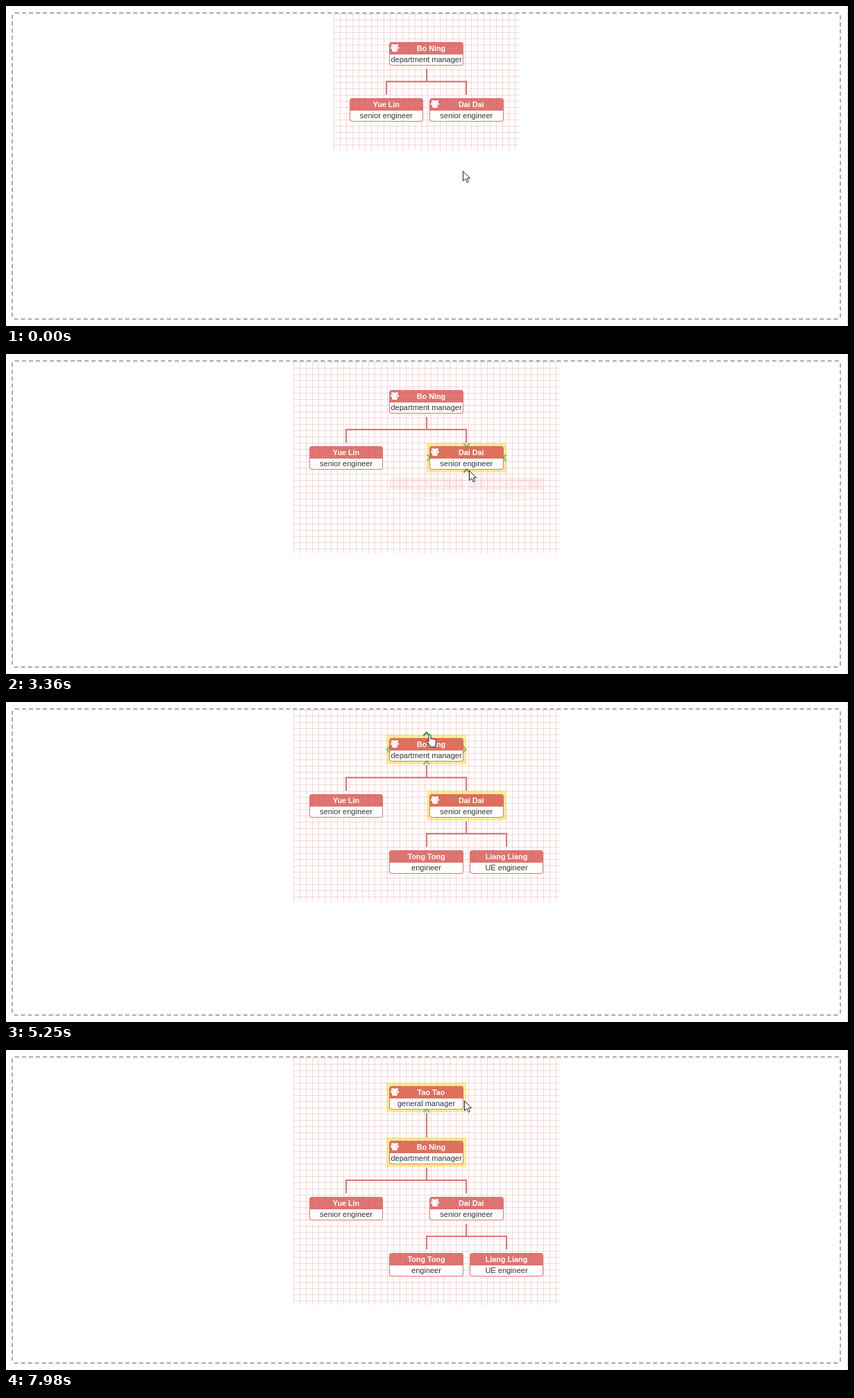
These frames come from a looping animation (1213x462 px, 8000 ms). An HTML page:

```html
<!DOCTYPE html>
<html lang="en">
<head>
<meta charset="utf-8">
<title>Org chart</title>
<style>
html, body { margin: 0; width: 100%; height: 100%; overflow: hidden; background: #fff; }
body { position: relative; font: 11px "Liberation Sans", Arial, sans-serif; color: #333; }
div, svg { position: absolute; box-sizing: border-box; }
svg { left: 0; top: 0; overflow: visible; fill: none; }
#frame { left: 8px; top: 9px; width: 1195px; height: 444px; border: 2px dashed #aaa; border-radius: 5px; }
#edge { left: 1212px; top: 0; width: 1px; height: 100%; background: #ddd; }
.grid {
  top: 11px;
  background: linear-gradient(90deg, rgba(200,0,0,.15) 1px, transparent 0),
              linear-gradient(rgba(200,0,0,.15) 1px, transparent 0);
  background-size: 9px 9px;
}
.node { width: 115.5px; height: 43px; text-align: center; white-space: nowrap; }
.title, .role { left: 4.5px; width: 106.5px; }
.title {
  top: 5px; height: 18px; font-weight: bold; font-size: 10.8px; line-height: 18px; color: #fff;
  background: rgba(217,83,79,.8); border-radius: 4px 4px 0 0;
}
.lead { padding-left: 14px; }
.title svg { left: 2px; top: 2px; fill: #fff; }
.role {
  top: 23px; height: 16px; line-height: 15px; background: #fff;
  border: 1px solid rgba(217,83,79,.8); border-top: 0; border-radius: 0 0 4px 4px;
}
.loading .title, .loading .role { opacity: .2; }
.line { stroke: rgba(217,83,79,.8); stroke-width: 2; }
</style>
</head>
<body>
<div id="frame"></div>
<div id="edge"></div>
<div id="scene"></div>
<script>
const LOOP = 8000, STEP = 70;
const MID = 605.5, SLOT = 115.5, ROW = 81, TOP = 47;
const GREEN = 'rgba(68,157,68,.5)', STRONG = '#449d44';

// Moments of the story
const HOVER_CHILD = 1610, LOAD_CHILD = 2520, CHILD_READY = 3360, LEAVE_CHILD = 4410;
const HOVER_TOP = 4620, OVER_EDGE = 5180, LOAD_TOP = 5810, TOP_READY = 6720, HOVER_ROOT = 7420;

// Pointer keys: time, x, y
const PATH = [
  [770, 658, 238], [1330, 663, 172], [1540, 663, 172], [1610, 664, 172], [2030, 667, 168],
  [3920, 667, 168], [3990, 668, 168], [4830, 623, 77], [5180, 608, 46],
  [7280, 608, 46], [7980, 660, 73]
];

const ease = p => p * p * (3 - 2 * p);
const ramp = (t, start, length) => ease(Math.min(1, Math.max(0, (t - start) / length)));
const during = (t, a, b) => t >= a && t < b;
const svg = body => `<svg width="1" height="1">${body}</svg>`;

const USERS = svg(`<circle cx="2.8" cy="2.8" r="1.8"/><circle cx="9.2" cy="2.8" r="1.8"/>
  <circle cx="6" cy="4" r="2.6"/>
  <path d="M0 7Q0 4.6 1.6 4.6L4.5 5.5 3 8H1Q0 8 0 7ZM12 7Q12 4.6 10.4 4.6L7.5 5.5 9 8H11Q12 8 12 7Z
  M2 10Q2 6.2 4 6.2H8Q10 6.2 10 10 10 12 8.4 12H3.6Q2 12 2 10Z"/>`);

const ARROW = 'M0 0V14L3.4 11 5.8 16.3 8 15.3 5.7 10.2H10Z';
const HAND = 'M3.5 11V2a1.5 1.5 0 0 1 3 0V7.2a1.4 1.4 0 0 1 2.7.3a1.3 1.3 0 0 1 2.5.4' +
  'a1.2 1.2 0 0 1 2.1.8V13q0 2-1.3 3.5V18.5H5.5V16.5L1 11q-.8-1.5.3-2q1-.3 2.2 2Z';

const SPOTS = { top: [57.75, 3], bottom: [57.75, 41], left: [3, 21.5], right: [112.5, 21.5] };

function chevron(side, turn, color = GREEN, dy = 0) {
  const [x, y] = SPOTS[side];
  return `<path d="M-4.5 2.2L0-2.3 4.5 2.2" stroke="${color}" stroke-width="2.6"
    transform="translate(${x} ${y + dy}) rotate(${turn})"/>`;
}

function spinner(elapsed) {
  return `<circle r="11.3" stroke="rgba(68,157,68,.8)" stroke-width="3.4" pathLength="360"
    stroke-dasharray="322 38" transform="translate(57.75 22) rotate(${elapsed * .18 - 71})"/>`;
}

function node(name, role, cx, y, { lead, glow = 0, edges = '', shown = 0, spin = -1 } = {}) {
  return `<div class="node ${spin < 0 ? '' : 'loading'}"
    style="left:${cx - SLOT / 2}px;top:${y}px;background:rgba(238,217,54,${glow / 2})">
    <div class="title ${lead ? 'lead' : ''}">${lead ? USERS : ''}${name}</div>
    <div class="role">${role}</div>
    ${svg(`<g opacity="${shown}">${edges}</g>` + (spin < 0 ? '' : spinner(spin)))}</div>`;
}

// Connector from a parent at row top y down to two children
function fork(cx, left, right, y) {
  const [c, l, r] = [cx, left, right].map(Math.round);
  return svg(`<path class="line" d="M${c} ${y + 44}V${y + 62}M${l} ${y + 81}V${y + 62}H${r}V${y + 81}"/>`);
}

function childNode(t, cx, y) {
  const loading = during(t, LOAD_CHILD, CHILD_READY);
  const hovered = during(t, HOVER_CHILD, LEAVE_CHILD);
  let edges = chevron('top', 180) + chevron('left', 90) + chevron('right', 270);
  if (t < LOAD_CHILD) edges += chevron('bottom', 180, t >= 2030 ? STRONG : GREEN);
  else if (!loading) edges += chevron('bottom', 0, '#c0843f');
  return node('Dai Dai', 'senior engineer', cx, y, {
    lead: true, edges,
    glow: t < LOAD_TOP ? ramp(t, HOVER_CHILD, 500) : 0,
    shown: hovered ? ramp(t, HOVER_CHILD, 300) : 0,
    spin: loading ? t - LOAD_CHILD : -1
  });
}

function managerNode(t, y) {
  const loading = during(t, LOAD_TOP, TOP_READY);
  return node('Bo Ning', 'department manager', MID, y, {
    lead: true,
    glow: ramp(t, HOVER_TOP, 500),
    shown: t < LOAD_TOP ? ramp(t, HOVER_TOP, 500) : 0,
    edges: chevron('top', 0, t >= OVER_EDGE ? STRONG : GREEN, -3.5) + chevron('left', 270) +
      chevron('right', 90) + chevron('bottom', 0),
    spin: loading ? t - LOAD_TOP : -1
  });
}

function pointer(t) {
  let [, x, y] = PATH[0];
  for (let i = 1; i < PATH.length; i++) {
    const [start, x0, y0] = PATH[i - 1], [end, x1, y1] = PATH[i];
    if (t < start) break;
    const p = ramp(t, start, end - start);
    x = x0 + (x1 - x0) * p;
    y = y0 + (y1 - y0) * p;
  }
  const hand = during(t, 2030, LOAD_CHILD) || during(t, OVER_EDGE, LOAD_TOP);
  x = Math.round(x) + (hand ? -2.5 : .5);
  y = Math.round(y) + .5;
  return svg(`<path d="${hand ? HAND : ARROW}" fill="#fff" stroke="#223" transform="translate(${x} ${y})"/>`);
}

function scene(t) {
  const open = t >= CHILD_READY, rooted = t >= TOP_READY;
  const y = rooted ? TOP + 79 : TOP;
  const left = MID - (open ? SLOT : SLOT / 2), right = MID + SLOT / 2;
  const width = open ? 383 : 267, height = rooted ? 357 : open ? 277 : 197;

  let html = `<div class="grid" style="left:${open ? 414 : 472}px;width:${width}px;height:${height}px"></div>`;
  if (rooted) {
    html += svg(`<path class="line" d="M606 ${TOP + 44}V${y}"/>`) +
      node('Tao Tao', 'general manager', MID, TOP, {
        lead: true, edges: chevron('bottom', 0),
        glow: ramp(t, HOVER_ROOT, 500), shown: ramp(t, HOVER_ROOT, 500)
      });
  }
  if (open) {
    const p = ramp(t, CHILD_READY - STEP, 350);
    html += `<div style="left:0;top:${40 * (p - 1)}px;opacity:${p}">` +
      fork(right, MID, MID + SLOT, y + ROW) +
      node('Tong Tong', 'engineer', MID, y + 2 * ROW) +
      node('Liang Liang', 'UE engineer', MID + SLOT, y + 2 * ROW) + '</div>';
  }
  return html + fork(MID, left, right, y) + managerNode(t, y) +
    node('Yue Lin', 'senior engineer', left, y + ROW) +
    childNode(t, right, y + ROW) + pointer(t);
}

const view = document.getElementById('scene');
let last = -1;
function draw() {
  const t = Math.floor(performance.now() % LOOP / STEP) * STEP;
  if (t !== last) view.innerHTML = scene(last = t);
  requestAnimationFrame(draw);
}
draw();
</script>
</body>
</html>
```
